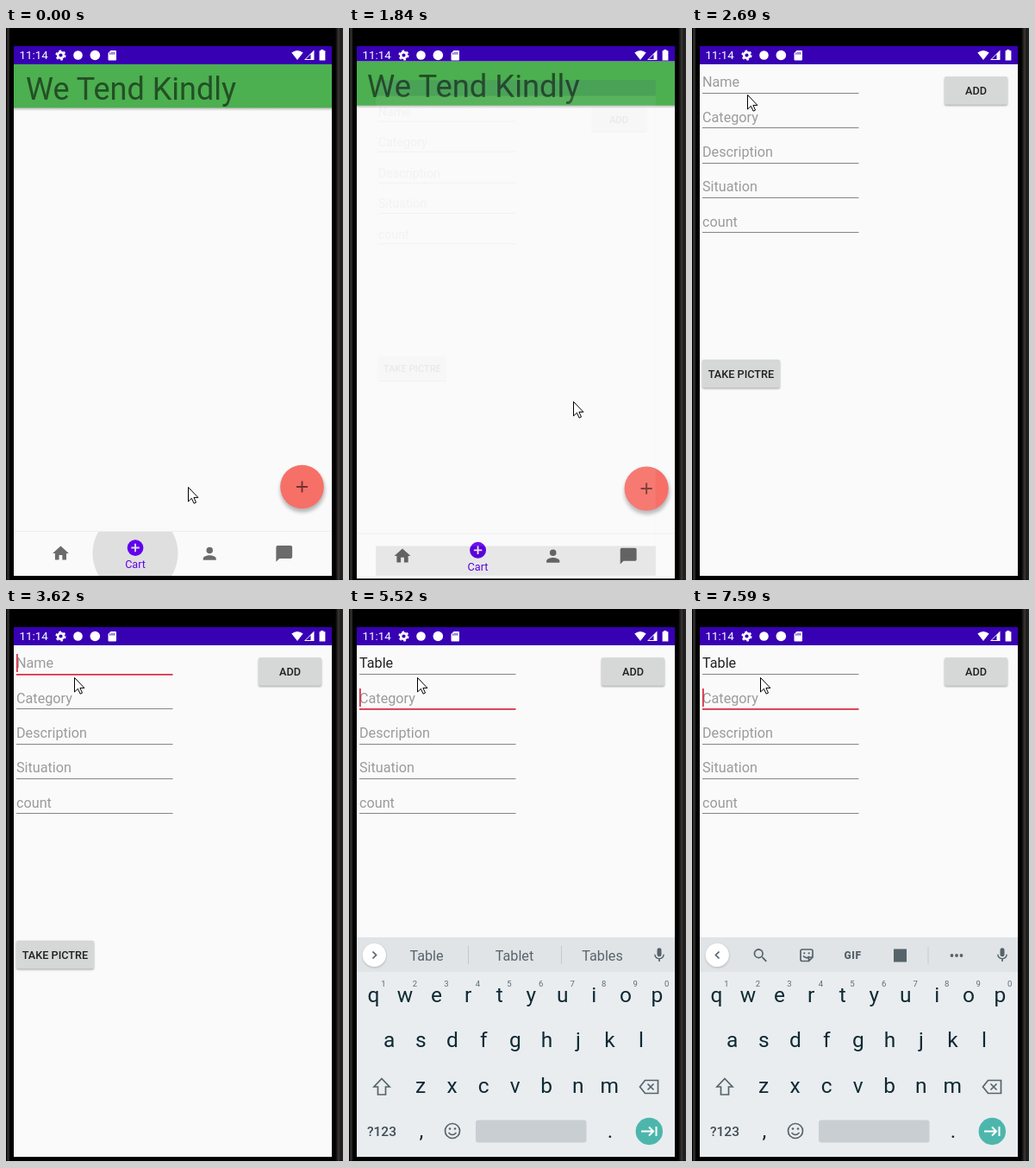
Recreate the animation shown at these times as an HTML page. Size 391x640 px, loop 8000 ms.

```html
<!DOCTYPE html>
<html lang="en">
<head>
<meta charset="utf-8">
<title>Add item form</title>
<style>
  html, body { margin: 0; width: 100%; height: 100%; overflow: hidden; background: #000; }
  svg { display: block; width: 391px; height: 640px; }
  text { font-family: Roboto, sans-serif; white-space: pre; }
  .mid { text-anchor: middle; }
  .title { font-size: 36px; fill: #235025; }
  .field { font-size: 16.2px; fill: #9b9b9b; }
  .button { font-size: 12.7px; font-weight: 500; fill: #202020; }
  .key { font-size: 24.5px; fill: #0f2a33; }
  .digit { font-size: 9.5px; fill: #5d6b72; }
  .word { font-size: 16.2px; fill: #58646a; }
  .stroke { fill: none; stroke: #56636a; stroke-width: 1.7; }
</style>
</head>
<body>
<svg viewBox="0 0 391 640">
  <defs>
    <clipPath id="screen"><rect x="9" y="21" width="369" height="618"/></clipPath>
    <clipPath id="navClip"><rect x="9" y="583" width="369" height="51"/></clipPath>
    <linearGradient id="drop" x2="0" y2="1">
      <stop stop-opacity=".24"/><stop offset="1" stop-opacity="0"/>
    </linearGradient>
    <linearGradient id="rim">
      <stop stop-color="#000"/><stop offset=".45" stop-color="#3a3735"/>
      <stop offset=".7" stop-color="#1b1a19"/><stop offset="1" stop-color="#2a2826"/>
    </linearGradient>
    <filter id="soft" x="-30%" y="-30%" width="160%" height="170%"><feGaussianBlur stdDeviation="2"/></filter>
    <filter id="thin" x="-10%" y="-20%" width="120%" height="150%"><feGaussianBlur stdDeviation=".9"/></filter>
    <symbol id="home" viewBox="0 0 24 24"><path d="M10 20v-6h4v6h5v-8h3L12 3 2 12h3v8z"/></symbol>
    <symbol id="cart" viewBox="0 0 24 24"><path d="M12 2a10 10 0 100 20 10 10 0 000-20zm5 11h-4v4h-2v-4H7v-2h4V7h2v4h4z"/></symbol>
    <symbol id="person" viewBox="0 0 24 24"><path d="M12 12a4 4 0 100-8 4 4 0 000 8zm0 2c-2.7 0-8 1.3-8 4v2h16v-2c0-2.700-5.300-4-8-4z"/></symbol>
    <symbol id="chat" viewBox="0 0 24 24"><path d="M20 2H4a2 2 0 00-2 2v18l4-4h14a2 2 0 002-2V4a2 2 0 00-2-2z"/></symbol>
    <symbol id="search" viewBox="0 0 24 24"><path d="M15.500 14h-.8l-.3-.3A6.500 6.500 0 109.500 16c1.600 0 3.100-.6 4.200-1.600l.3.3v.8l5 5 1.500-1.500zm-6 0a4.500 4.500 0 110-9 4.500 4.500 0 010 9z"/></symbol>
    <symbol id="mic" viewBox="0 0 24 24"><path d="M12 14a3 3 0 003-3V5a3 3 0 00-6 0v6a3 3 0 003 3zm5.300-3a5.300 5.300 0 01-10.600 0H5a7 7 0 006 6.700V21h2v-3.300A7 7 0 0019 11z"/></symbol>
  </defs>

  <rect width="391" height="640"/>
  <rect x="1" width="3" height="640" fill="#2b2927"/>
  <rect x="382" width="9" height="640" fill="url(#rim)"/>

  <g clip-path="url(#screen)">
    <g id="listPage">
      <rect x="9" y="21" width="369" height="652"/>
      <rect x="9" y="21" width="369" height="613" fill="#fafafa"/>
      <rect x="9" y="21" width="369" height="21" fill="#3700b3"/>
      <rect x="9" y="42" width="369" height="50.500" fill="#4caf50"/>
      <rect x="9" y="92.500" width="369" height="3.500" fill="url(#drop)"/>
      <text class="title" x="23" y="83">We Tend Kindly</text>
      <circle cx="344" cy="534.500" r="26" opacity=".27" filter="url(#soft)"/>
      <circle cx="343.500" cy="531" r="25.300" fill="#f67068"/>
      <path d="M337 531h13M343.500 524.500v13" stroke="#71332f" stroke-width="1.900"/>
      <rect x="9" y="582" width="369" height="1" fill="#eee"/>
      <circle id="ripple" cx="150" cy="608" r="49.500" fill="#dfdfdf" clip-path="url(#navClip)"/>
      <g fill="#6b6b6b">
        <use href="#home" x="52.200" y="596.800" width="22.500" height="22.500"/>
        <use href="#person" x="225" y="597" width="22.500" height="22.500"/>
        <use href="#chat" x="311.500" y="597" width="22.500" height="22.500"/>
      </g>
      <g fill="#6200ee">
        <use href="#cart" x="138.800" y="590.300" width="22.500" height="22.500"/>
        <text class="mid" x="150" y="625" font-size="12.600">Cart</text>
      </g>
    </g>

    <g id="formPage">
      <rect x="9" y="21" width="369" height="652"/>
      <rect x="9" y="21" width="369" height="613" fill="#fafafa"/>
      <rect x="9" y="21" width="369" height="21" fill="#3700b3"/>
      <g id="fields"></g>
      <g id="buttons"></g>
      <rect id="caret" y="52" width="1.800" height="21" fill="#d9344a"/>
    </g>

    <g id="keyboard">
      <rect x="9" y="380" width="369" height="254" fill="#e9edf0"/>
      <rect x="9" y="380" width="369" height="40" fill="#e0e4e7"/>
      <circle cx="29.500" cy="401.500" r="13.800" opacity=".18" filter="url(#thin)"/>
      <circle cx="29.300" cy="400.500" r="13.600" fill="#fff"/>
      <path id="chevron" class="stroke"/>
      <use href="#mic" x="350" y="390.500" width="20" height="20" fill="#56636a"/>
      <g id="tools" fill="#56636a">
        <use href="#search" x="69" y="390.500" width="21" height="21"/>
        <path class="stroke" d="M128 394h10q2 0 2 2v7l-4.500 4.500H128q-2 0-2-2V396q0-2 2-2zM140 403h-3q-1.500 0-1.500 1.500v3M129 401.500q4 4 7 .5"/>
        <circle cx="130.300" cy="398.300" r="1.100"/><circle cx="135.700" cy="398.300" r="1.100"/>
        <text class="mid" x="186.500" y="405" font-size="12" font-weight="900" letter-spacing=".6">GIF</text>
        <rect x="234" y="393.500" width="15" height="15"/>
        <rect x="273.500" y="391" width="1" height="20" fill="#c6ccd0"/>
        <circle cx="301.500" cy="401" r="1.900"/><circle cx="307" cy="401" r="1.900"/><circle cx="312.500" cy="401" r="1.900"/>
      </g>
      <g id="hints">
        <path d="M138.500 390v21M246.500 390v21" stroke="#c3c9cd"/>
        <text class="word mid" x="90" y="406.500"></text>
        <text class="word mid" x="192" y="406.500"></text>
        <text class="word mid" x="294" y="406.500"></text>
      </g>
      <g id="keys"></g>
      <path class="stroke" d="M38 543.500l9 9.500h-4.500v9h-9v-9H29z"/>
      <path class="stroke" d="M343.500 545.500H358.500v15H343.500L337.500 553zM346.500 549.500l7 7m0-7l-7 7"/>
      <text class="mid" x="38" y="609.500" font-size="15.500" font-weight="500" fill="#3e4c53">?123</text>
      <text class="key mid" x="84" y="612">,</text>
      <text class="key mid" x="303" y="612">.</text>
      <circle class="stroke" cx="120" cy="604" r="8.500"/>
      <path class="stroke" d="M115.500 606q4.500 5 9 0"/>
      <circle cx="117" cy="601.500" r="1.300" fill="#56636a"/><circle cx="123" cy="601.500" r="1.300" fill="#56636a"/>
      <rect x="147" y="591.500" width="128.500" height="26" rx="3" fill="#c8ced2"/>
      <circle cx="348.300" cy="604.500" r="15.700" fill="#4db6ac"/>
      <path d="M339 604.500h14m-5-5l5 5-5 5M356.500 599v11" fill="none" stroke="#fff" stroke-width="2"/>
    </g>
  </g>

  <g fill="#fff">
    <text x="15.500" y="36.300" font-size="13.300">11:14</text>
    <circle cx="63.500" cy="31.500" r="3.400" fill="none" stroke="#fff" stroke-width="2.600"/>
    <circle cx="63.500" cy="31.500" r="5.200" fill="none" stroke="#fff" stroke-width="1.800" stroke-dasharray="2.700 2.745"/>
    <circle cx="83.500" cy="31.500" r="5.300"/>
    <circle cx="103.300" cy="31.500" r="5.800"/>
    <path d="M121.500 26h5.500q1 0 1 1v9.500q0 1-1 1h-7.500q-1 0-1-1V29z"/>
    <path d="M120.800 28.500v2.200m2.200-3v3m2.200-3v3" stroke="#3700b3"/>
    <path d="M331.300 28.500q6.700-5 13.400 0L338 37z"/>
    <path d="M357.500 25.500V37H346z"/>
    <path d="M353.500 30.500V36h-5.500z" fill="#3700b3"/>
    <path d="M365.200 25h3.200v1.300h2V37.500h-6.800V26.300h1.600z"/>
  </g>
  <rect y="639" width="391" height="1" fill="#e4e4e4"/>
  <path id="mouse" d="M.5.500V17l3.900-3.700 2.700 5.900 2.400-1.100-2.600-5.700h5z" fill="#fff" stroke="#000"/>
</svg>

<script>
const LOOP = 8000;
const CENTER = [193.5, 347];
// Screen refresh times; the picture holds still in between.
const TICKS = [0, 120, 260, 400, 540, 680, 810, 1410, 1550, 1700, 1840, 1960, 2110, 2260, 2410,
  2560, 2690, 2830, 2960, 3090, 3230, 3360, 3490, 3620, 4210, 4510, 4660, 4800, 4940, 5080, 5210,
  5520, 5670, 6110, 6570, 7140, 7590];
const MOUSE = [[0, 211, 531], [120, 213, 529], [260, 222, 523], [400, 245, 521], [540, 290, 527],
  [680, 330, 535], [810, 345, 539], [1410, 343, 535], [1840, 260, 432], [2410, 182, 175],
  [2560, 112, 112], [2690, 64, 77], [3230, 70, 70], [3490, 75, 75], [3620, 79, 79]];
const ZOOM = [[1785, 0], [1840, .2], [1960, .88], [2110, .98], [2260, 1]];
const FADE = [[1836, 0], [1840, .07], [1885, 1]];
const RIPPLE = [[0, 1], [540, 0]];
const CARET_ON = [[3620, 4210], [4510, 6110], [6570, 7140], [7590, LOOP]];
const WORD = 'Table';
const GUESSES = ['T The To', 'Ta Take Talk', 'Tab Table Tabs', 'Tabl Table Tables', 'Table Tablet Tables'];
const TYPE_FROM = 4660, NEXT_FIELD = 5520, TOOLS_BACK = 5670;

const $ = id => document.getElementById(id);

function add(parent, tag, attrs, text = '') {
  const el = document.createElementNS('http://www.w3.org/2000/svg', tag);
  for (const k in attrs) el.setAttribute(k, attrs[k]);
  el.textContent = text;
  return parent.appendChild(el);
}

// Linear interpolation of [time, ...values] points.
function track(points, t) {
  let i = points.findIndex(p => p[0] > t);
  if (i < 0) return points[points.length - 1].slice(1);
  if (i === 0) return points[0].slice(1);
  const a = points[i - 1], b = points[i], u = (t - a[0]) / (b[0] - a[0]);
  return a.slice(1).map((v, k) => v + (b[k + 1] - v) * u);
}

const labels = ['Name', 'Category', 'Description', 'Situation', 'count'];
const fields = labels.map((label, i) => {
  const y = 40.3 * i;
  return {
    text: add($('fields'), 'text', { class: 'field', x: 12, y: 68.3 + y }, label),
    line: add($('fields'), 'rect', { x: 12, y: Math.round(75 + y), width: 181.5, height: 1 })
  };
});

function button(x, y, w, label) {
  const box = { x, y, width: w, height: 32.5, rx: 1.8 };
  add($('buttons'), 'rect', { ...box, y: y + 1.3, opacity: .32, filter: 'url(#thin)' });
  add($('buttons'), 'rect', { ...box, fill: '#d6d7d7' });
  add($('buttons'), 'text', { class: 'button mid', x: x + w / 2, y: y + 21 }, label);
}
button(293, 56.3, 73, 'ADD');
button(12, 383.8, 90, 'TAKE PICTRE');

[['qwertyuiop', 28.5, 454.5], ['asdfghjkl', 46.7, 507], ['zxcvbnm', 83, 560]].forEach(([row, x0, y], r) => {
  [...row].forEach((c, i) => {
    const x = x0 + 36.55 * i;
    add($('keys'), 'text', { class: 'key mid', x, y }, c);
    if (r === 0) add($('keys'), 'text', { class: 'digit mid', x: x + 11.3, y: 437 }, (i + 1) % 10);
  });
});

const hintWords = $('hints').querySelectorAll('text');
const show = (el, on) => el.setAttribute('visibility', on ? 'visible' : 'hidden');

function zoom(el, s) {
  const [x, y] = CENTER;
  el.setAttribute('transform', `translate(${x} ${y}) scale(${s}) translate(${-x} ${-y})`);
}

function draw(t) {
  const [p] = track(ZOOM, t), [alpha] = track(FADE, t);
  zoom($('listPage'), 1 + .055 * p);
  zoom($('formPage'), .85 + .15 * p);
  $('formPage').setAttribute('opacity', alpha);
  $('ripple').setAttribute('opacity', track(RIPPLE, t)[0]);
  $('mouse').setAttribute('transform', `translate(${track(MOUSE, t)})`);

  const typed = t < TYPE_FROM ? 0 : Math.min(WORD.length, TICKS.indexOf(t) - TICKS.indexOf(TYPE_FROM) + 1);
  const focus = t < 3360 ? -1 : t < NEXT_FIELD ? 0 : 1;
  const name = fields[0].text;
  name.textContent = typed ? WORD.slice(0, typed) : labels[0];
  name.style.fill = typed ? '#222' : '';
  fields.forEach(({ line }, i) => {
    line.setAttribute('fill', i === focus ? '#d9344a' : '#858585');
    line.setAttribute('height', i === focus ? 1.8 : 1);
  });

  show($('caret'), CARET_ON.some(([a, b]) => t >= a && t < b));
  $('caret').setAttribute('x', focus === 0 && typed ? 12.5 + name.getComputedTextLength() : 12);
  $('caret').setAttribute('y', focus === 1 ? 92 : 52);

  const keyboard = t >= 4510, hints = keyboard && typed > 0 && t < TOOLS_BACK;
  show($('keyboard'), keyboard);
  show($('tools'), keyboard && !hints);
  show($('hints'), hints);
  $('chevron').setAttribute('d', hints ? 'M27.500 396.500l4 4-4 4' : 'M31.500 396.500l-4 4 4 4');
  if (hints) GUESSES[typed - 1].split(' ').forEach((w, i) => hintWords[i].textContent = w);
}

let last = -1;
function frame() {
  const now = performance.now() % LOOP;
  const tick = TICKS.filter(t => t <= now).pop();
  if (tick !== last) draw(last = tick);
  requestAnimationFrame(frame);
}
frame();
</script>
</body>
</html>
```
